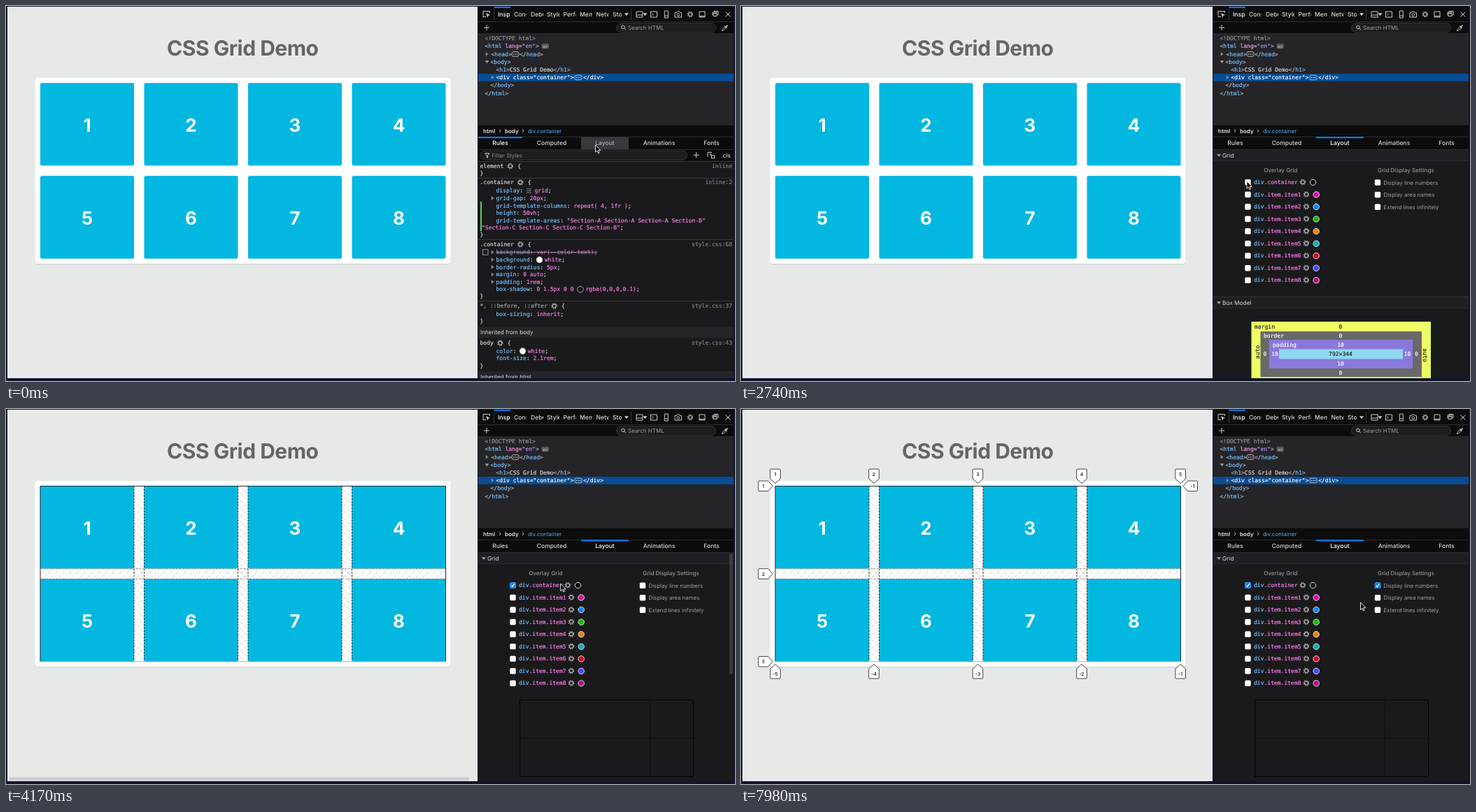
Recreate the animation shown at these times as an HTML page. Size 1042 by 537 pixels, loop 8 s.

```html
<!DOCTYPE html>
<html lang="en">
<head>
<meta charset="utf-8">
<title>CSS Grid Demo</title>
<style>
html, body { margin: 0; width: 100%; height: 100%; overflow: hidden; background: #12142b; }
#stage { display: block; width: 100%; height: 100%; }
text { white-space: pre; font-family: Inter, "Open Sans", sans-serif; text-rendering: geometricPrecision; }
.m { font: 8.02px "DejaVu Sans Mono", monospace; stroke-width: .18; }
.i { fill: none; stroke: #c8c8cc; stroke-width: 1; }
</style>
</head>
<body>
<svg id="stage" viewBox="0 0 1042 537"></svg>
<script>
const LOOP = 8000;
const BLUE = '#75bfff', PINK = '#ff7de9', GREY = '#939395', LIGHT = '#d7d7db', WHITE = '#fff', PANEL = '#1a1a1c', BAR = '#0c0c0d';
const COLS = [49, 197.5, 346, 494.5], ROWS = [110.2, 243.3], CW = 134, RH = 118.4;

const esc = s => s.replace(/&/g, '&amp;').replace(/</g, '&lt;');
const rect = (x, y, w, h, fill, more = '') => `<rect x="${x}" y="${y}" width="${w}" height="${h}" fill="${fill}" ${more}/>`;
const path = (d, more = 'class="i"') => `<path d="${d}" ${more}/>`;
const dot = (x, y, r, more) => `<circle cx="${x}" cy="${y}" r="${r}" ${more}/>`;
const group = (id, body, more = '') => `<g id="${id}" ${more}>${body}</g>`;
const sans = (x, y, s, size, fill, more = '') =>
  `<text x="${x}" y="${y}" font-size="${size}" fill="${fill}" ${more}>${esc(s)}</text>`;
const mid = (x, y, s, size, fill, more = '') => sans(x, y, s, size, fill, 'text-anchor="middle" ' + more);

// Monospace line centred on cy, given as pairs of string and colour.
function mono(x, cy, parts, more = '') {
  let spans = '';
  for (let i = 0; i < parts.length; i += 2)
    spans += `<tspan fill="${parts[i + 1]}" stroke="${parts[i + 1]}">${esc(parts[i])}</tspan>`;
  return `<text class="m" x="${x}" y="${cy + 2.8}" ${more}>${spans}</text>`;
}
const monoMid = (x, cy, s, fill) => mono(x, cy, [s, fill], 'text-anchor="middle"');

const right = (x, y) => path(`M${x - 1.8} ${y - 3}L${x + 2} ${y}L${x - 1.8} ${y + 3}Z`, 'fill="#86868a"');
const down = (x, y, c = '#a0a0a4') => path(`M${x - 3} ${y - 1.8}H${x + 3}L${x} ${y + 2}Z`, `fill="${c}"`);
const gear = (x, y, c = '#b8b8bc') =>
  dot(x, y, 2.5, `fill="none" stroke="${c}" stroke-width="1.1"`) +
  dot(x, y, 3.7, `fill="none" stroke="${c}" stroke-width="1.2" stroke-dasharray="1.45 1.456"`);
const plus = (x, y) => path(`M${x - 4} ${y}H${x + 4}M${x} ${y - 4}V${y + 4}`);
const more = (x, y) => rect(x - 5, y - 3.3, 10, 6.6, 'none', 'rx="2" stroke="#d7d7db" stroke-width=".8"') +
  [-2.5, 0, 2.5].map(d => dot(x + d, y, .7, 'fill="#fff"')).join('');
const box = (x, y) => rect(x - 4.2, y - 4.2, 8.4, 8.4, WHITE, 'rx="1.6"');
const ticked = (id, x, y) => group(id, rect(x - 4.2, y - 4.2, 8.4, 8.4, '#0a84ff', 'rx="1.6"') +
  path(`M${x - 2.3} ${y + .2}L${x - .6} ${y + 2}L${x + 2.4} ${y - 2.2}`, 'fill="none" stroke="#fff" stroke-width="1.2"'));

function page() {
  let s = rect(2, 1, 672, 532, '#e7e9e9') +
    mid(338.3, 71, 'CSS Grid Demo', 30, '#666', 'font-weight="700" letter-spacing="-.5"') +
    rect(41.5, 104, 594, 266.3, '#d2d4d4', 'rx="4"') + rect(41.5, 103, 594, 266, WHITE, 'rx="4"');
  ROWS.forEach((y, r) => COLS.forEach((x, c) => {
    s += rect(x, y, CW, RH, '#02b7e0', 'rx="2"') +
      mid(x + CW / 2, y + 69.6, String(r * 4 + c + 1), 26, WHITE, 'font-weight="700"');
  }));
  return s;
}

function overlay() {
  const gapY = ROWS[0] + RH, gapH = ROWS[1] - gapY, bottom = ROWS[1] + RH;
  const hatch = (id, d) => `<pattern id="${id}" width="10.2" height="10.2" patternUnits="userSpaceOnUse">` +
    path(d, 'stroke="#b4b4b4" stroke-width=".8" stroke-dasharray="3.6 2.2"') + '</pattern>';
  let s = hatch('back', 'M0 0L10.2 10.2') + hatch('fore', 'M0 10.2L10.2 0') +
    rect(49, gapY, 579.5, gapH, 'url(#fore)');
  let v = '';
  COLS.slice(0, 3).forEach((x, i) => {
    const a = x + CW, b = COLS[i + 1];
    s += rect(a, 110, b - a, bottom - 110, 'url(#back)');
    v += `M${a} 110V${bottom}M${b} 110V${bottom}`;
  });
  return s + path(v, 'fill="none" stroke="#222" stroke-width=".9" stroke-dasharray="2.8 1.6"') +
    path(`M49 ${gapY}H628.5M49 ${gapY + gapH}H628.5`, 'stroke="#777" stroke-width=".8" stroke-dasharray="2.8 1.6"') +
    path(`M49 ${bottom}V110.4H628.5V${bottom}`, 'fill="none" stroke="#1c2a30" stroke-width="1"') +
    path(`M49 ${bottom}H628.5`, 'stroke="#8a9a9e" stroke-width=".7"');
}

function lineNumbers() {
  const tag = (x, y, turn, label) => `<g transform="translate(${x} ${y})">` +
    path('M-6.3 -7H6.3Q7.3 -7 7.3 -6V7L0 13.5L-7.3 7V-6Q-7.3 -7 -6.3 -7Z',
      `transform="rotate(${turn})" fill="#fff" stroke="#333" stroke-width=".9"`) +
    mid(0, 2.5, String(label), 7, '#111', 'font-weight="500"') + '</g>';
  let s = '';
  [49, 190, 338.5, 487, 628.2].forEach((x, i) => { s += tag(x, 93, 0, i + 1) + tag(x, 379, 180, i - 5); });
  [110.3, 236, 361.7].forEach((y, i) => { s += tag(31.8, y, -90, i + 1); });
  return s + tag(645.5, 110.3, 90, -1);
}

function toolbar() {
  let s = rect(675, 1, 365, 532, PANEL) + rect(675, 1, 365, 39, BAR) + rect(697.5, 1, 23.5, 1.8, '#0a84ff') +
    path('M686 15.5H682V7.5H691.5V10') + path('M686 10L692 13L689.4 13.8L688.4 16.5Z', 'fill="#c8c8cc"');
  ['Inspector', 'Console', 'Debugger', 'Style Editor', 'Performance', 'Memory', 'Network', 'Storage'].forEach((name, i) => {
    const x = [703, 726, 750, 773, 796.5, 820, 843.5, 867][i];
    s += `<svg x="${x}" y="4" width="${i == 7 ? 13.5 : 18}" height="16">` +
      sans(0, 11, name, 8.6, i ? LIGHT : WHITE, 'font-weight="500"') + '</svg>';
  });
  s += down(887, 12, LIGHT) + path('M893.5 4V20M697.5 4V20', 'stroke="#38383d"') +
    path('M901 8H910V16H901ZM901 13H910') + down(913.5, 12, LIGHT) +
    path('M921.5 8H930.5V16H921.5ZM923.5 10.3L925.3 12L923.5 13.7') +
    path('M941.3 7H946.3V17H941.3ZM941.3 14H946.3') +
    path('M956 9.5H958.5L959.5 8H962.5L963.5 9.5H965.5V16H956Z') + dot(960.8, 12.6, 1.8, 'class="i"') + gear(978, 12) +
    path('M991 8H999V16H991ZM991 14.5H999') + path('M1011 13H1010V9H1016V10M1012 8.5V7.5H1018V12.5H1016.5M1011 10.5H1016V14.5H1011Z') +
    path('M1028.5 8.5L1035.5 15.5M1035.5 8.5L1028.5 15.5') +
    path('M675 22.5H1040M675 39.5H1040', 'stroke="#2c2c30"') + plus(687, 31) +
    rect(872.5, 24.5, 142, 13.5, '#1d1d20', 'rx="6.7" stroke="#3a3a3f" stroke-width=".8"') +
    dot(882, 30.3, 2.3, 'class="i"') + path('M883.7 32L886 34.3') + sans(889, 34.2, 'Search HTML', 8, '#a0a0a3') +
    path('M1023.5 35.5L1024 33.5L1028 29.5L1029.5 31L1025.5 35Z') + path('M1027.5 28.5L1030.5 31.5M1029 30L1031.5 27.5', 'stroke="#c8c8cc" stroke-width="1.6"');
  return s;
}

function markup() {
  const B = '#b6bcc4';
  const open = name => ['<', B, name, BLUE, '>', B], close = name => ['</', B, name, BLUE, '>', B];
  return rect(675, 40, 365, 130, '#252529') + rect(675, 97, 365, 10.8, '#074d94') +
    mono(684.5, 46, ['<!DOCTYPE html>', GREY], 'font-style="italic"') +
    mono(684.5, 57.4, ['<', B, 'html', BLUE, ' lang', '#ff97e9', '=', B, '"en"', '#b98eff', '>', B]) +
    rect(765.5, 53.8, 10.5, 7.5, '#56565b', 'rx="2"') + mid(770.7, 59.7, 'ev', 6, '#d0d0d4') +
    right(687.5, 68.7) + mono(693.5, 68.7, open('head')) + more(728, 68.9) + mono(734, 68.7, close('head')) +
    down(687.5, 80) + mono(692.5, 79.9, open('body')) +
    mono(700.5, 91.1, [...open('h1'), 'CSS Grid Demo', LIGHT, ...close('h1')]) +
    right(695.5, 102.3) + mono(700.5, 102.3, ['<div class="container">', WHITE], 'font-weight="700"') + more(818, 102.4) +
    mono(825, 102.3, ['</div>', WHITE], 'font-weight="700"') +
    mono(692.5, 113.6, close('body')) + mono(684.5, 124.8, close('html')) +
    rect(675, 170, 365, 36, BAR) + path('M675 170H1040M675 187.5H1040M675 205.5H1040', 'stroke="#2c2c30"') +
    sans(682, 181.6, 'html', 8, '#e4e4e8', 'font-weight="600"') + sans(713, 181.6, 'body', 8, '#e4e4e8', 'font-weight="600"') +
    sans(746, 181.6, 'div.container', 7.9, '#5aaef5') + path('M705 176.5L707 178.8L705 181M738 176.5L740 178.8L738 181');
}

function tabs() {
  let s = rect(822, 188, 68, 17.3, '#38383d', 'id="hover"') + rect(675, 187.3, 63, 2, '#0a84ff', 'id="active"');
  ['Rules', 'Computed', 'Layout', 'Animations', 'Fonts'].forEach((name, i) => {
    s += mid([706.5, 780, 856, 933.5, 1008.5][i], 199.4, name, 8.5, LIGHT, `id="tab${i}" font-weight="500"`);
  });
  return s;
}

function rules() {
  const head = (y, name, from, fill = LIGHT) => {
    const x = 677.5 + name.length * 4.83;
    return mono(677.5, y, [name, fill]) + gear(x + 9.5, y) + mono(x + 20, y, ['{', LIGHT]) +
      mono(1038, y, [from, '#808084'], 'text-anchor="end"');
  };
  const prop = (y, name, value, arrow) => (arrow ? right(695.5, y) : '') +
    mono(700.5, y, [name, BLUE, ': ', LIGHT, value, PINK, ';', LIGHT]);
  const swatch = (x, y, fill) => dot(x, y, 4.3, `fill="${fill}" stroke="#bbb" stroke-width=".9"`);
  const rest = (x, y, s) => mono(x, y, [s, PINK, ';', LIGHT]);
  const name = (y, s, arrow) => (arrow ? right(695.5, y) : '') + mono(700.5, y, [s, BLUE, ':', LIGHT]);
  const section = (y, s) => rect(675, y - 7.5, 365, 15.5, '#252529') + sans(678, y + 3, s, 8.1, LIGHT);
  let s = rect(675, 206, 365, 17, BAR) + path('M675 222.5H1040M675 246.5H1040M675 334.5H1040M675 422.5H1040', 'stroke="#38383d"') +
    rect(677.5, 207.3, 296, 13, '#1d1d20', 'rx="6.5" stroke="#3a3a3f" stroke-width=".8"') +
    path('M684.7 211H690.7L688.5 214V217.5L687 216.5V214Z') + sans(694.5, 217, 'Filter Styles', 7.8, '#909094') +
    plus(986.5, 213.5) + path('M1003 216V209.5H1009M1005 212H1008V215') + rect(1008.5, 214, 4, 4, 'none', 'class="i"') +
    sans(1022, 216.5, '.cls', 8.2, LIGHT, 'font-weight="500"');
  s += head(229.3, 'element', 'inline') + head(252.6, '.container', 'inline:2') + head(341.2, '.container', 'style.css:68') +
    head(429.6, '*, ::before, ::after', 'style.css:37', '#a4a4a8') + head(482.6, 'body', 'style.css:43');
  [239, 327.4, 415.6, 451, 515].forEach(y => { s += mono(677.5, y, ['}', LIGHT]); });
  s += name(264.6, 'display') + path('M744.5 262H750.5M744.5 264.6H750.5M744.5 267.2H750.5', 'stroke="#b0b0b4" stroke-dasharray="1.6 .6"') +
    rest(755.5, 264.6, 'grid') + prop(275.2, 'grid-gap', '20px', true) +
    prop(285.8, 'grid-template-columns', 'repeat( 4, 1fr )') + prop(296.4, 'height', '50vh') +
    mono(700.5, 307, ['grid-template-areas', BLUE, ': ', LIGHT, '"Section-A Section-A Section-A Section-B"', PINK]) +
    rest(680, 317.3, '"Section-C Section-C Section-C Section-B"') + rect(678, 280, 2, 42.5, '#54d05c');
  s += rect(681.5, 348.8, 7.5, 7.5, 'none', 'stroke="#b0b0b4" stroke-width=".8"') + right(695.5, 352.6) +
    mono(700.5, 352.6, ['background', BLUE, ': ', LIGHT, 'var(--color-text)', PINK, ';', LIGHT], 'opacity=".75"') +
    path('M700.5 352.8H845', 'stroke="#d9a0cf" stroke-width=".8"') +
    name(363.2, 'background', true) + swatch(762.5, 363.4, WHITE) + rest(770, 363.2, 'white') +
    prop(373.8, 'border-radius', '5px', true) + prop(384.4, 'margin', '0 auto', true) + prop(395, 'padding', '1rem', true) +
    mono(700.5, 405.6, ['box-shadow', BLUE, ': ', LIGHT, '0 1.5px 0 0', PINK]) + swatch(821, 405.8, BAR) + rest(828.5, 405.6, 'rgba(0,0,0,0.1)');
  s += prop(440.8, 'box-sizing', 'inherit') + section(467, 'Inherited from body') +
    name(494, 'color') + swatch(738.5, 494.1, WHITE) + rest(746, 494, 'white') + prop(504.6, 'font-size', '2.1rem') +
    `<svg x="675" y="522" width="365" height="11" viewBox="675 522 365 11">${section(530.5, 'Inherited from html')}</svg>`;
  return s;
}

function layout() {
  const swatches = ['#0c0c0d', '#df00a9', '#0a84ff', '#12bc00', '#ea8000', '#00b0bd', '#d70022', '#4b42ff', '#b5007f'];
  let s = mid(771.3, 238.2, 'Overlay Grid', 8.1, GREY, 'font-weight="500"') +
    mid(950.5, 238.2, 'Grid Display Settings', 8.1, GREY, 'font-weight="500"');
  swatches.forEach((c, i) => {
    const y = 252.2 + i * 17.54;
    s += box(724.5, y + .2) + mono(733, y, ['div', BLUE, i ? '.item.item' + i : '.container', PINK], 'stroke-width=".3"') +
      gear(i ? 808 : 803, y) + dot(i ? 822.2 : 817.5, y + .3, 4.2, `fill="${c}" stroke="#e0e0e4" stroke-width="1"`);
  });
  ['Display line numbers', 'Display area names', 'Extend lines infinitely'].forEach((label, i) => {
    const y = 252.7 + i * 17.54;
    s += box(910, y) + sans(918.5, y + 3, label, 7.9, '#a0a0a3');
  });
  return s + ticked('gridOn', 724.5, 252.4) + ticked('numsOn', 910, 252.7);
}

function boxModel() {
  const vertical = (x, y, turn) => `<g transform="translate(${x} ${y}) rotate(${turn})">${monoMid(0, 0, 'auto', '#222')}</g>`;
  let s = path('M675 416.5H1040', 'stroke="#303035"') +
    rect(729.5, 452, 256.5, 81, '#edff64') + rect(742.5, 466, 230.5, 65.3, '#696969') +
    rect(755, 478, 205, 41, '#8a79dd') + rect(769, 491.5, 177, 14, '#8fd9f0') +
    mono(734, 459, ['margin', '#222']) + mono(747, 472, ['border', WHITE]) + mono(760, 485.2, ['padding', WHITE]) +
    monoMid(857, 459, '0', '#222') + monoMid(857, 498.4, '792×344', '#222') + vertical(738, 495.5, -90) + vertical(977.5, 500, 90);
  [[857, 472, '0'], [857, 485.2, '10'], [857, 512, '10'], [857, 525, '0'],
   [749, 498.4, '0'], [763, 498.4, '10'], [952.5, 498.4, '10'], [965.5, 498.4, '0']]
    .forEach(([x, y, label]) => { s += monoMid(x, y, label, WHITE); });
  return s;
}

const outline = () => rect(734.5, 416.5, 248, 110, 'none', 'stroke="#040405"') +
  path('M920.5 416.5V526.5M734.5 471.5H982.5', 'stroke="#09090a" stroke-dasharray="3 2"');

const header = (y, label) => rect(675, y, 365, 15.5, '#202024') + path(`M675 ${y + 15.5}H1040`, 'stroke="#2a2a2e"') +
  down(683, y + 8) + sans(688, y + 11, label, 8.3, LIGHT);

document.getElementById('stage').innerHTML =
  rect(0, 0, 1042, 537, '#12142b') + page() + group('overlay', overlay()) + group('nums', lineNumbers()) +
  toolbar() + markup() + tabs() + group('rules', rules()) +
  group('layout', group('headGrid', header(206, 'Grid')) + layout() +
    group('boxModel', boxModel() + group('headBox', header(417, 'Box Model'))) + group('outline', outline())) +
  rect(4, 527, 658, 5, '#808282', 'id="barX" rx="2.5"') + rect(1034, 207, 5, 220, '#98989b', 'id="barY" rx="2.5"') +
  path('M0 0V10.4L2.4 8.2L4 11.8L5.6 11.1L4.1 7.6H7.4Z', 'id="pointer" fill="#000" stroke="#fff" stroke-width=".9"');

const el = id => document.getElementById(id);
const show = (id, on) => el(id).setAttribute('visibility', on ? 'inherit' : 'hidden');

// Progress in n equal jumps, the first at a and the last at b.
const jumps = (t, a, b, n) => t < a ? 0 : t >= b ? 1 : (Math.floor((t - a) / (b - a) * (n - 1)) + 1) / n;
const ease = p => p * p * (3 - 2 * p);

// start, end, jumps, x, y
const MOVES = [
  [1410, 1850, 4, 744.5, 239], [2140, 2140, 1, 720.5, 256], [2590, 2740, 2, 723, 251],
  [3780, 4820, 7, 900, 249], [4970, 5270, 3, 910, 254], [7240, 7980, 5, 885.5, 277]
];

function draw(t) {
  let x = 842.5, y = 199;
  for (const [a, b, n, tx, ty] of MOVES) {
    const p = ease(jumps(t, a, b, n));
    x += (tx - x) * p;
    y += (ty - y) * p;
  }
  el('pointer').setAttribute('transform', `translate(${x} ${y})`);

  const inLayout = t >= 330, grid = t >= 3180, nums = t >= 6760;
  show('rules', !inLayout);
  show('layout', inLayout);
  show('headGrid', t >= 740);
  show('headBox', t >= 740 && !grid);
  show('boxModel', inLayout && !grid);
  show('outline', grid);
  show('overlay', grid);
  show('gridOn', grid);
  show('nums', nums);
  show('numsOn', nums);

  show('hover', t < 1410);
  el('hover').setAttribute('fill', inLayout ? '#222225' : '#38383d');
  el('active').setAttribute('x', inLayout ? 822 : 675);
  el('active').setAttribute('width', inLayout ? 68 : 63);
  el('tab0').setAttribute('fill', inLayout ? LIGHT : WHITE);
  el('tab2').setAttribute('fill', inLayout ? WHITE : '#b1b1b3');

  const bars = nums ? 1 - jumps(t, 7240, 7610, 3) : grid ? 1 - jumps(t, 3780, 4230, 4) : inLayout ? 1 - jumps(t, 740, 1270, 4) : 0;
  el('barX').setAttribute('opacity', grid ? bars : 0);
  el('barY').setAttribute('opacity', bars);
  el('barY').setAttribute('height', grid ? 173 : 220);
}

function tick() {
  draw(performance.now() % LOOP);
  requestAnimationFrame(tick);
}
tick();
</script>
</body>
</html>
```
